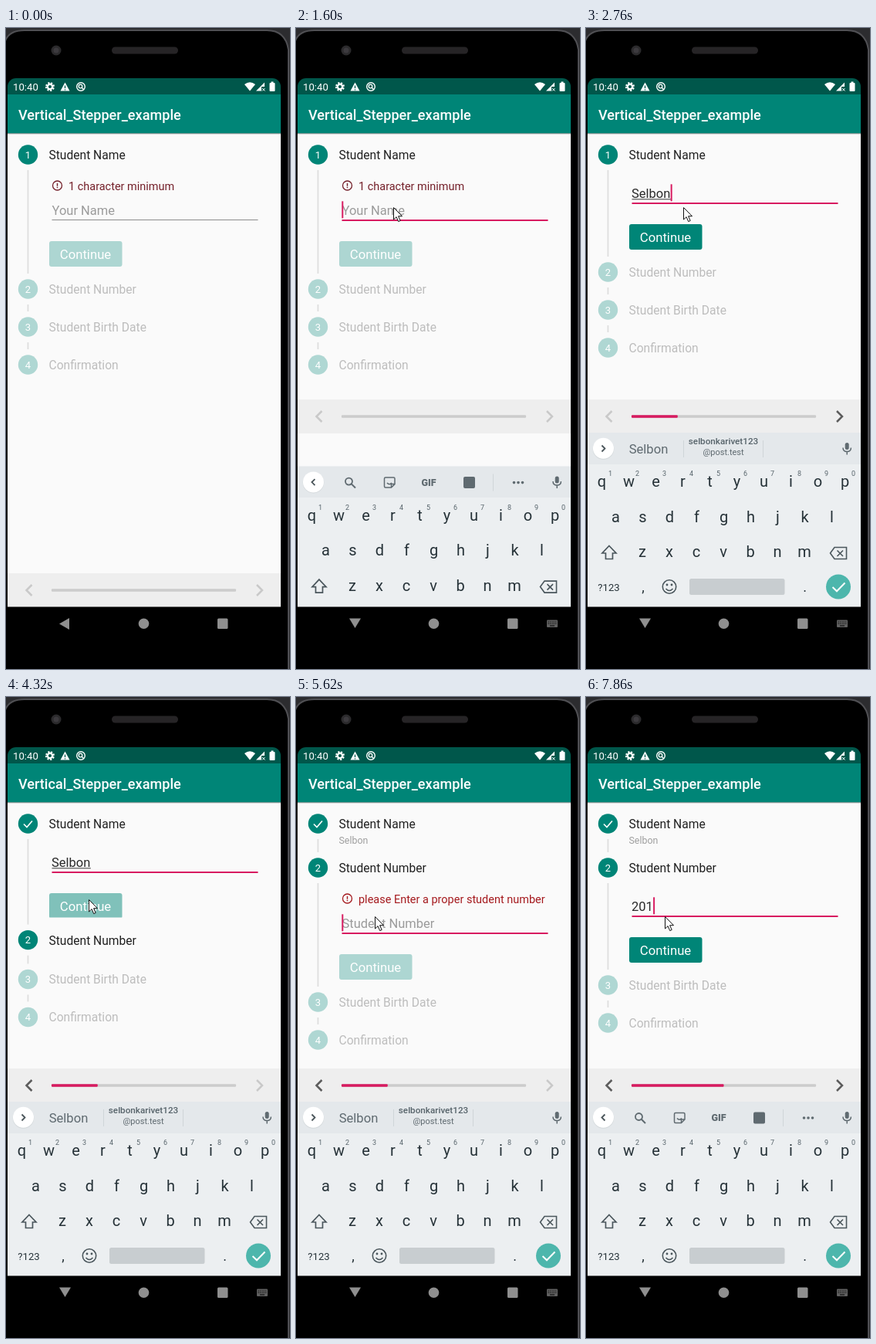
Recreate the animation shown at these times as an HTML page with a canvas. Size 368 by 830 pixels, loop 8000 ms.

```html
<!DOCTYPE html>
<html lang="en">
<head>
<meta charset="utf-8">
<title>Vertical stepper</title>
<style>
  html, body { margin: 0; width: 100%; height: 100%; overflow: hidden; background: #000; }
  canvas { display: block; width: 368px; height: 830px; }
</style>
</head>
<body>
<canvas id="stage" width="368" height="830"></canvas>
<script>
const ctx = document.getElementById('stage').getContext('2d');
const LOOP = 8000, TICK = 77.37, TICK_START = 200;
const TEAL = '#008577', PINK = '#d81b60', PAPER = '#fafafa', KEY = '#263238', ICON = '#5f6a70';
const NAME = 'Selbon';

// Drawing helpers
function box(x, y, w, h, color, r = 0) {
  ctx.fillStyle = color;
  ctx.beginPath();
  ctx.roundRect(x, y, w, h, r);
  ctx.fill();
}
function disc(x, y, r, color) {
  ctx.fillStyle = color;
  ctx.beginPath();
  ctx.arc(x, y, r, 0, 7);
  ctx.fill();
}
function fill(path, color) {
  ctx.fillStyle = color;
  ctx.fill(new Path2D(path));
}
function stroke(path, color, width) {
  ctx.strokeStyle = color;
  ctx.lineWidth = width;
  ctx.stroke(new Path2D(path));
}
function ring(x, y, r, color, width) {
  stroke(`M${x - r} ${y}a${r} ${r} 0 1 0 ${2 * r} 0a${r} ${r} 0 1 0 ${-2 * r} 0`, color, width);
}
// y is the middle of the capital letters
function text(str, x, y, size, color, align = 'left', weight = 400) {
  ctx.font = `${weight} ${size}px Roboto, sans-serif`;
  ctx.textAlign = align;
  ctx.fillStyle = color;
  ctx.fillText(str, x, y + size * 0.355);
  return ctx.measureText(str).width;
}
function group(alpha, draw) {
  ctx.save();
  ctx.globalAlpha *= alpha;
  draw();
  ctx.restore();
}

// Timing helpers
const mix = (a, b, k) => a + (b - a) * k;
const ramp = (t, start, length) => Math.min(1, Math.max(0, (t - start) / length));
const ease = k => (1 - Math.cos(Math.PI * k)) / 2;
const within = (t, ...spans) => spans.some(([a, b]) => t >= a && t < b);
const latest = (t, list) => list.reduce((value, [at, next]) => t >= at ? next : value, '');

const typedName = [[1900, 1], [2380, 2], [2450, 3], [2680, 5], [2760, 6]]
  .map(([at, n]) => [at, NAME.slice(0, n)]);
const typedNumber = [[7400, '2'], [7550, '20'], [7860, '201']];
const suggestions = [
  [1900, ['S', 'Should', 'So']],
  [2380, ['Se', 'See', 'Second']],
  [2450, ['Sel', 'Self', 'Select']],
  [2680, [NAME.slice(0, 5), '', '']],
  [2760, [NAME, '', '']],
];
const mousePath = [
  [200, 188, 476], [350, 128, 209], [515, 128, 209], [970, 126, 232],
  [3460, 126, 232], [3830, 107, 262], [4850, 107, 262], [5150, 102, 284],
];
const clicks = [[1210, 1290], [4090, 4240], [5390, 5470]];

function drawPhone() {
  box(0, 0, 368, 830, '#2c2c2f');
  const body = 'M-2 20Q2 3 24 3H338Q362 3 366 28V832H-2Z';
  fill(body, '#000');
  stroke(body, '#505054', 2);
  disc(65, 29, 6.5, '#2b2a2c');
  disc(65, 29, 3.5, '#3c3a3e');
  box(137, 24.5, 86, 9, '#262426', 4.5);
}

function drawBars() {
  box(2, 65, 354, 22, '#00574b', [11, 11, 0, 0]);
  text('10:40', 9, 76, 13.2, '#fff');
  ring(57, 76, 3.2, '#fff', 2.4);
  ctx.setLineDash([2.1, 1.83]);
  ring(57, 76, 5, '#fff', 2);
  ctx.setLineDash([]);
  fill('M70.5 81.5L76.5 70.5L82.5 81.5Z', '#fff');
  stroke('M76.5 74.5V78M76.5 79.3V80.5', '#00574b', 1.3);
  ring(97, 76, 5.3, '#fff', 1.4);
  ring(96.5, 75.5, 2.3, '#fff', 1.3);
  stroke('M98 77L101 80', '#fff', 1.4);
  fill('M309 73Q316 67.5 323 73L316 81.5Z', '#fff');
  fill('M324 81.5L335 70.5V76H331V81.5Z', '#fff');
  stroke('M332 78L335.5 81.5M335.5 78L332 81.5', '#fff', 1);
  box(341.5, 71, 7, 11, '#fff', 1);
  box(343.5, 69.5, 3, 2, '#fff');
  box(2, 86, 354, 50.5, TEAL);
  text('Vertical_Stepper_example', 16, 113, 18.1, '#fff', 'left', 500);
}

function drawContent(y, s) {
  const shift = 22 * s.valid;
  group(Math.max(0, 1 - 1.4 * s.errorFade), () => {
    const ey = y + 40 - shift / 2;
    ring(66.5, ey, 6, s.errorColor, 1.3);
    stroke(`M66.5 ${ey - 3}v3.8M66.5 ${ey + 1.8}v1.4`, s.errorColor, 1.4);
    text(s.error, 81, ey + 0.5, 14.47, s.errorColor);
  });
  const fy = y + 72.3 - shift;
  let width = 0;
  if (s.value) {
    width = text(s.value, 59, fy, 16.5, '#2b2b2b');
    if (s.composing) box(59.5, fy + 7, width, 1, '#3a3a3a');
  } else {
    text(s.hint, 59.5, fy, 16.5, '#9b9b9b');
  }
  if (s.caret) box(59.3 + width, fy - 12, 2, 22, PINK);
  if (s.focused) box(59.5, y + 84 - shift, 267, 2, PINK);
  else box(59.5, y + 84, 267, 1, '#8c8c8c');
  const by = y + 112 - shift;
  group(s.buttonAlpha, () => box(56, by, 94.5, 33, TEAL, 3));
  text('Continue', 103, by + 16.7, 16.7, '#fff', 'center');
}

function drawStep(number, title, y, height, active, done) {
  disc(28.5, y, 12.7, active ? TEAL : '#afd7d3');
  if (done) stroke(`M23 ${y + 0.5}l4 4l7 -8`, '#fff', 1.6);
  else text(number, 28.5, y, 13, '#fff', 'center');
  text(title, 55.5, y + 0.5, 15.6, active ? '#212121' : '#bdbdbd');
  if (height) box(27.6, y + 20, 1.8, height - 40, '#dedede');
}

function clipped(y, height, draw) {
  ctx.save();
  ctx.beginPath();
  ctx.rect(40, y + 20, 316, Math.max(0, height - 49));
  ctx.clip();
  draw();
  ctx.restore();
}

function drawSteps(t, held) {
  const nameFade = ramp(held, 1929, 200), numberFade = ramp(held, 7423, 200);
  const nameValid = ease(nameFade), numberValid = ease(numberFade);
  const advance = ease(ramp(held, 4285, 200));
  const moved = t >= 4300;
  const h1 = mix(174 - 22 * nameValid, 57, advance);
  const h2 = mix(49, 174 - 22 * numberValid, advance);
  const y1 = 164, y2 = y1 + h1, y3 = y2 + h2;

  if (advance < 1) clipped(y1, h1, () => drawContent(y1, {
    hint: 'Your Name', error: '1 character minimum', value: latest(t, typedName), composing: true,
    errorColor: t < 1900 ? '#74202a' : '#a51a1e',
    valid: nameValid, errorFade: nameFade, focused: t >= 1290,
    caret: within(t, [1290, 3310], [3825, 4240]),
    buttonAlpha: t < 1900 ? 0.31 : moved ? 0.49 : 1,
  }));
  if (advance > 0) clipped(y2, h2, () => drawContent(y2, {
    hint: 'Student Number', error: 'please Enter a proper student number',
    value: latest(t, typedNumber), errorColor: '#a51a1e',
    valid: numberValid, errorFade: numberFade, focused: t >= 5470,
    caret: within(t, [5470, 6190], [6700, 7170], [7400, LOOP]),
    buttonAlpha: t < 7400 ? 0.31 : 1,
  }));
  group(Math.max(0, 2 * advance - 1), () => text(NAME, 55.5, 186, 12.4, '#9e9e9e'));

  drawStep(1, 'Student Name', y1, h1, true, moved);
  drawStep(2, 'Student Number', y2, h2, moved);
  drawStep(3, 'Student Birth Date', y3, 49, false);
  drawStep(4, 'Confirmation', y3 + 49, 0, false);
}

function drawPager(t, y) {
  const shade = on => on ? '#5c5c5c' : '#c9c9c9';
  box(2, y - 22, 354, 44, '#eeeeee');
  stroke(`M33.5 ${y - 7}l-7 7l7 7`, shade(t >= 4300), 2.5);
  stroke(`M325 ${y - 7}l7 7l-7 7`, shade(within(t, [1900, 4300], [7400, LOOP])), 2.5);
  box(59, y - 1.8, 239, 3.6, '#cccccc', 1);
  const progress = t < 1900 ? 0 : t < 7400 ? 0.25 : 0.5;
  if (progress) box(59, y - 1.8, 239 * progress, 3.6, PINK, 1);
}

function drawTools() {
  ring(68.5, 543.5, 4.5, ICON, 1.8);
  stroke('M71.8 546.8L77 552', ICON, 2);
  stroke('M116 538.5H126.5Q128 538.5 128 540V547L123.5 551.5H116Q114.5 551.5 114.5 550V540Q114.5 538.5 116 538.5ZM123.5 551V547H128M118 545.5Q121 549 124 545.5', ICON, 1.5);
  text('GIF', 172, 545, 12.5, ICON, 'center', 900);
  box(217, 537.5, 15, 15, ICON, 2);
  box(255, 534, 1, 22, '#cfd5d8');
  for (const x of [282.5, 288, 293.5]) disc(x, 545, 1.8, ICON);
}

function drawSuggestions(t) {
  const words = latest(t, suggestions) || [];
  [81, 177.5, 274].forEach((x, i) => text(words[i] || '', x, 545.5, 16.6, ICON, 'center'));
  if (t >= 2680) {
    text(NAME.toLowerCase() + 'karivet123', 178, 534.5, 11.7, '#56636a', 'center', 500);
    text('@post.test', 178, 549.5, 11, ICON, 'center');
  }
  box(126, 534, 1, 22, '#cfd5d8');
  box(229, 534, 1, 22, '#cfd5d8');
}

function drawKeyboard(t, held) {
  box(2, 524, 354, 41, '#e4e8eb');
  box(2, 565, 354, 185, '#eceff1');

  const tools = t < 1900 ? 1 : ease(ramp(held, 5690, 560));
  group(1 - tools, () => drawSuggestions(t));
  group(tools, () => {
    ctx.translate(-30 * (1 - tools), 0);
    drawTools();
  });
  disc(22.5, 545, 13.8, '#d3d8db');
  disc(22.5, 544.3, 13.5, '#fff');
  group(1, () => {
    ctx.translate(22.5, 544.5);
    ctx.rotate(Math.PI * tools);
    stroke('M-2 -4L2 0L-2 4', '#4a555a', 1.8);
  });
  box(335.7, 537, 5, 9, ICON, 2.5);
  stroke('M333 543.5Q333 548.5 338.2 548.5Q343.4 548.5 343.4 543.5M338.2 548.5V552.5', ICON, 1.5);

  [...'qwertyuiop'].forEach((key, i) => {
    text(key, 20.5 + 35 * i, 587, 20, KEY, 'center');
    text((i + 1) % 10, 31.5 + 35 * i, 577, 9, '#56636a', 'center');
  });
  [...'asdfghjkl'].forEach((key, i) => text(key, 38.5 + 35 * i, 632.5, 20, KEY, 'center'));
  [...'zxcvbnm'].forEach((key, i) => text(key, 73 + 35 * i, 678, 20, KEY, 'center'));

  stroke('M30 670.5L39 680H34.5V687.5H25.5V680H21Z', '#4a565c', 1.7);
  stroke('M322 672.5H337.5V687.5H322L316.5 680ZM325.5 676.5L333 684M333 676.5L325.5 684', '#4a565c', 1.6);
  text('?123', 29.5, 724, 13.2, KEY, 'center');
  text(',', 74, 724, 18, KEY, 'center');
  ring(108, 723.5, 8.7, '#4a565c', 1.6);
  disc(105, 721, 1.4, '#4a565c');
  disc(111, 721, 1.4, '#4a565c');
  stroke('M103.5 726Q108 731 112.5 726', '#4a565c', 1.6);
  box(134, 713, 123.5, 21, '#c8cdd0', 2.5);
  text('.', 283.5, 724, 18, KEY, 'center');
  disc(327, 723.5, 16, '#4db6ac');
  stroke('M319.5 724L325 729.3L335.5 718.5', '#fff', 2);
}

function drawNavigation(typing) {
  const gray = '#8f8f8f';
  box(2, 749.5, 354, 46, '#000');
  fill(typing ? 'M69 764.5H84L76.5 777Z' : 'M69 771.5L82 764V779Z', gray);
  disc(178.5, 771.3, 6.8, gray);
  box(274, 764.5, 13.5, 13.5, gray, 1.5);
  if (typing) {
    box(325, 766.5, 14, 9.5, '#606060', 1);
    ctx.setLineDash([1.2, 1.2]);
    stroke('M326.5 769H338M326.5 771.3H338', '#000', 1.1);
    ctx.setLineDash([]);
    stroke('M329 774H335', '#000', 1);
  }
}

function drawMouse(t, held) {
  if (t < 200) return;
  let [, x, y] = mousePath[0];
  for (let i = 1; i < mousePath.length; i++) {
    const [a, ax, ay] = mousePath[i - 1], [b, bx, by] = mousePath[i];
    if (held < a) break;
    const k = ramp(held, a, b - a);
    x = mix(ax, bx, k);
    y = mix(ay, by, k);
  }
  const arrow = `M${x + 0.5} ${y + 0.5}v15.5l3.6 -3.4l2.6 6l2.5 -1.1l-2.6 -5.8h4.9Z`;
  fill(arrow, '#fff');
  stroke(arrow, '#111', 1);
  if (within(t, ...clicks)) group(0.6, () => {
    ctx.globalCompositeOperation = 'multiply';
    disc(x, y, 15, '#fff700');
  });
}

function draw() {
  const t = performance.now() % LOOP;
  const held = Math.floor((t - TICK_START) / TICK) * TICK + TICK_START;
  const typing = t >= 1440;
  drawPhone();
  drawBars();
  box(2, 136.5, 354, 613, PAPER);
  box(2, 136.5, 354, 1.5, 'rgba(0,0,0,.12)');
  drawSteps(t, held);
  drawPager(t, typing ? 503 : 728);
  if (typing) group(1, () => {
    ctx.beginPath();
    ctx.rect(2, 524, 354, 226);
    ctx.clip();
    ctx.translate(0, 226 * (1 - ramp(held, 1430, 290)) ** 2);
    drawKeyboard(t, held);
  });
  drawNavigation(typing);
  drawMouse(t, held);
  requestAnimationFrame(draw);
}
draw();
</script>
</body>
</html>
```
